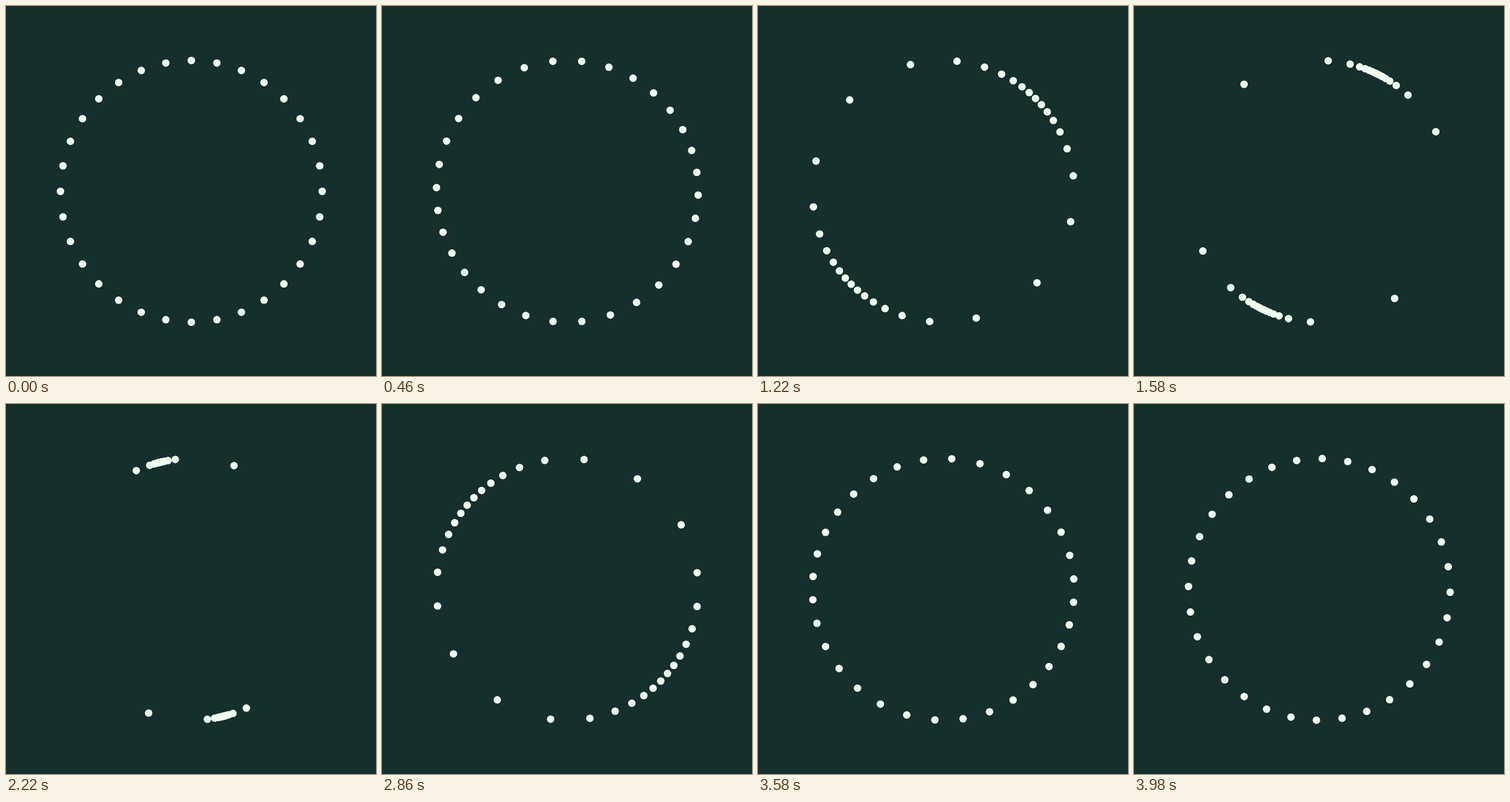
These frames come from a looping animation (540x540 px, 4 s). An HTML page with a canvas:

```html
<!DOCTYPE html>
<html lang="en">
<head>
<meta charset="utf-8">
<title>Dots on a turning circle</title>
<style>
  html, body { margin: 0; width: 100%; height: 100%; overflow: hidden; background: #152f2d; }
  canvas { display: block; width: 540px; height: 540px; }
</style>
</head>
<body>
<canvas id="stage" width="540" height="540"></canvas>
<script>
  const ctx = document.getElementById('stage').getContext('2d');
  const LOOP = 4000, STEP = 20;
  const COUNT = 32, CENTER = 270.5, RADIUS = 191;
  const TAU = Math.PI * 2;

  // Turn a flat ring about an axis tilted 45 degrees towards the viewer,
  // then push each projected point back out to the rim.
  function place(i, turn) {
    const angle = TAU * i / COUNT;
    const px = Math.cos(angle), py = Math.sin(angle);
    const c = Math.cos(turn), s = Math.sin(turn) * Math.SQRT1_2;
    const x = px * (1 + c) / 2 + py * s;
    const y = py * c - px * s;
    const len = Math.hypot(x, y) || 1;
    return [CENTER + RADIUS * x / len, CENTER + RADIUS * y / len];
  }

  function fillDots(dots, r, color) {
    ctx.fillStyle = color;
    for (const [x, y] of dots) {
      ctx.beginPath();
      ctx.arc(x, y, r, 0, TAU);
      ctx.fill();
    }
  }

  function draw(ms) {
    const time = Math.floor(ms / STEP + 0.05) * STEP % LOOP;
    const turn = TAU * time / LOOP;
    const dots = Array.from({ length: COUNT }, (_, i) => place(i, turn));
    ctx.fillStyle = '#152f2d';
    ctx.fillRect(0, 0, 540, 540);
    fillDots(dots, 6.3, '#0f2424');
    fillDots(dots, 5.5, '#effff0');
  }

  const start = performance.now();
  function tick() {
    draw(performance.now() - start);
    requestAnimationFrame(tick);
  }
  tick();
</script>
</body>
</html>
```
